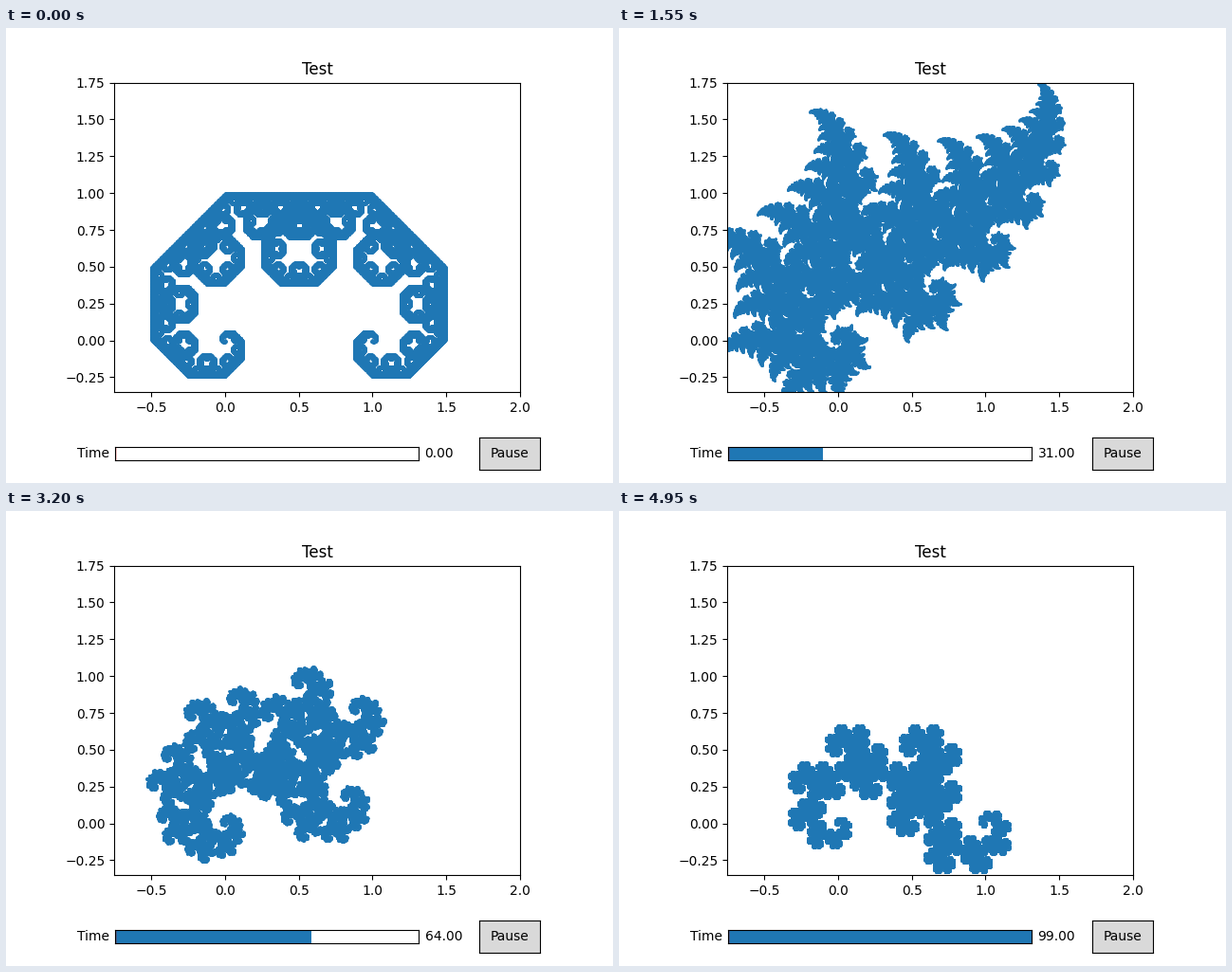
A matplotlib script that plays this animation: 640 px wide and 480 px high, repeating every 5 s.

```python
import matplotlib.pyplot as plt
import numpy as np
from matplotlib.animation import FuncAnimation

STEPS = 100
DEPTH = 17
ROOT = (1 + 1j) / 2


def fractal(t):
    """Points of a two-map system turning from a Levy curve into a dragon."""
    turn = np.sqrt(0.5) * np.exp(1j * np.pi * (t - 0.25))
    shift = (1 - t) * ROOT + t
    points = np.zeros(1, complex)
    for _ in range(DEPTH):
        points = np.concatenate([ROOT * points, turn * points + shift])
    return points


def panel(rect, color):
    box = fig.add_axes(rect, facecolor=color)
    box.set_xticks([])
    box.set_yticks([])
    return box


fig, ax = plt.subplots(figsize=(6.4, 4.8), dpi=100)
fig.subplots_adjust(bottom=0.2)
ax.set_title("Test")
ax.set_aspect("equal")
ax.set_xlim(-0.75, 2)
ax.set_ylim(-0.35, 1.75)
ax.set_xticks(np.arange(-0.5, 2.1, 0.5))
ax.set_yticks(np.arange(-0.25, 1.8, 0.25))
dots, = ax.plot([], [], "o", color="C0", markersize=1)

# Time slider
track = panel([0.18, 0.05, 0.5, 0.03], "white")
fill = track.axvspan(0, 0, facecolor="C0", edgecolor="none")
track.axvline(0, color="red", linewidth=1)
track.set_xlim(0, STEPS - 1)
track.text(-0.02, 0.5, "Time", transform=track.transAxes,
           ha="right", va="center")
value = track.text(1.02, 0.5, "", transform=track.transAxes,
                   ha="left", va="center")

button = panel([0.78, 0.03, 0.1, 0.07], "0.85")
button.text(0.5, 0.5, "Pause", transform=button.transAxes,
            ha="center", va="center")


def update(step):
    points = fractal(step / (STEPS - 1))
    dots.set_data(points.real, points.imag)
    fill.set_xy([(0, 0), (0, 1), (step, 1), (step, 0)]) \
        if not hasattr(fill, "set_width") else fill.set_width(step)
    value.set_text(f"{step:.2f}")
    return dots, fill, value


anim = FuncAnimation(fig, update, frames=STEPS, interval=50,
                     repeat=True, repeat_delay=0)
plt.show()
```
